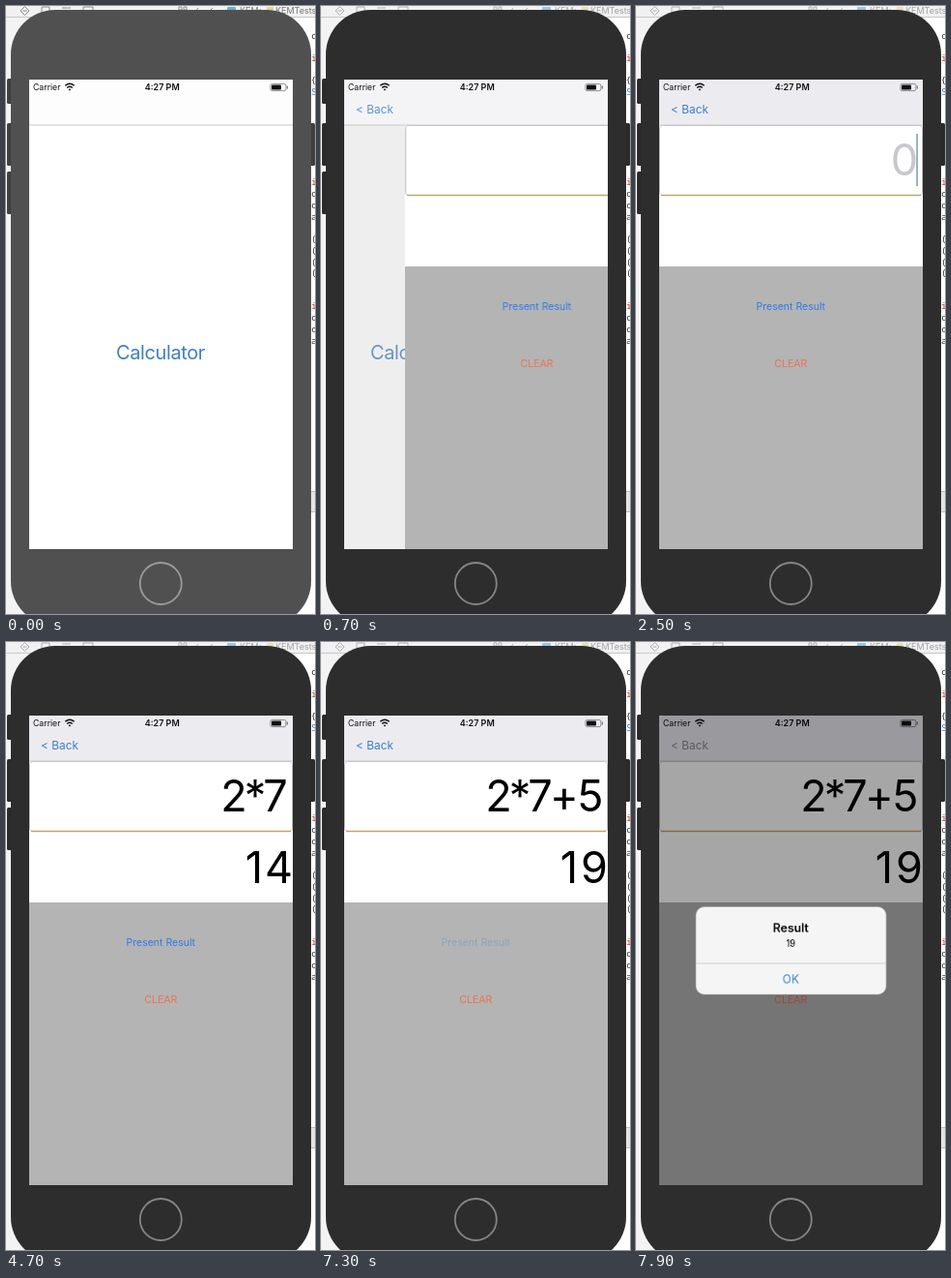
An HTML page that plays this animation: 320 by 628 pixels, repeating every 8 s.

```html
<!DOCTYPE html>
<html lang="en">
<head>
<meta charset="utf-8">
<title>Calculator demo</title>
<style>
html, body { margin: 0; width: 100%; height: 100%; overflow: hidden; background: #f3f3f3; }
svg { display: block; width: 320px; height: 628px; font-family: Inter, Roboto, sans-serif; }
.mid { text-anchor: middle; }
.big { font-size: 45px; text-anchor: middle; }
.code { font: 9.5px "Noto Sans Mono", monospace; }
.anim, .anim * { animation: 8s linear infinite; }

/* window focus */
.anim .shell { animation-name: shell; animation-timing-function: step-end; }
.anim .keys { animation-name: keys; animation-timing-function: step-end; }
.anim .ring { animation-name: ring; animation-timing-function: step-end; }
.anim .bar { animation-name: bar; animation-timing-function: step-end; }
@keyframes shell { 0%, 100% { fill: #505050; } 5% { fill: #2d2d2d; } }
@keyframes keys { 0%, 100% { fill: #3f3f3f; } 5% { fill: #2a2a2a; } }
@keyframes ring { 0%, 100% { stroke: #9a9a9a; } 5% { stroke: #858585; } }
@keyframes bar { 0%, 100% { opacity: 1; } 5% { opacity: .65; } }

/* page push */
.anim .home { animation-name: home; }
.anim .shade { animation-name: shade; }
.anim .page { animation-name: page; }
.anim .nav { animation-name: nav; }
.anim .back { animation-name: back; }
.anim .open { animation-name: open; }
@keyframes home {
  0%, 5% { transform: none; animation-timing-function: cubic-bezier(.25,.37,.3,1); }
  13.75%, 100% { transform: translateX(-82px); }
}
@keyframes shade {
  0%, 5% { opacity: 0; animation-timing-function: cubic-bezier(.25,.37,.3,1); }
  13.75%, 100% { opacity: .088; }
}
@keyframes page {
  0%, 5% { transform: translateX(273px); animation-timing-function: cubic-bezier(.25,.37,.3,1); }
  13.75%, 100% { transform: none; }
}
@keyframes nav { 0%, 5% { fill: #fdfdfd; } 12%, 100% { fill: #ecebf0; } }
@keyframes back { 0%, 5% { opacity: 0; } 8.75% { opacity: .82; } 12%, 100% { opacity: 1; } }
@keyframes open { 0%, 1.2% { opacity: 1; } 2.5%, 5% { opacity: .3; } 8.75% { opacity: .75; } 12%, 100% { opacity: 1; } }

/* typing and results */
.anim .hint, .anim .typed, .anim .sum { animation-timing-function: step-end; }
.anim .hint { animation-name: hint; }
.anim .t1 { animation-name: t1; }
.anim .t2 { animation-name: t2; }
.anim .t3 { animation-name: t3; }
.anim .t4 { animation-name: t4; }
.anim .t5 { animation-name: t5; }
.anim .s1 { animation-name: s1; }
.anim .s2 { animation-name: s2; }
@keyframes hint { 0% { opacity: 1; } 45%, 100% { opacity: 0; } }
@keyframes t1 { 0%, 49.375%, 100% { opacity: 0; } 45% { opacity: 1; } }
@keyframes t2 { 0%, 53.75%, 100% { opacity: 0; } 49.375% { opacity: 1; } }
@keyframes t3 { 0%, 68.75%, 100% { opacity: 0; } 53.75% { opacity: 1; } }
@keyframes t4 { 0%, 73.125%, 100% { opacity: 0; } 68.75% { opacity: 1; } }
@keyframes t5 { 0% { opacity: 0; } 73.125%, 100% { opacity: 1; } }
@keyframes s1 { 0%, 81.25%, 100% { opacity: 0; } 56.25% { opacity: 1; } }
@keyframes s2 { 0% { opacity: 0; } 81.25%, 100% { opacity: 1; } }
.anim .caret { animation-name: caret; }
@keyframes caret {
  0%, 18.74% { opacity: 0; }
  18.75%, 22.5% { opacity: 1; }
  26.25%, 29.75% { opacity: 0; }
  31.25% { opacity: .68; }
  33.125%, 37.5% { opacity: 1; }
  41.25%, 44.99% { opacity: 0; }
  45%, 56.24% { opacity: 1; }
  56.25%, 62.49% { opacity: 0; }
  62.5%, 66.25% { opacity: 1; }
  68.5% { opacity: .2; }
  68.75%, 81.24% { opacity: 1; }
  81.25%, 100% { opacity: 0; }
}

/* alert */
.anim .show { animation-name: show; }
.anim .dim { animation-name: dim; }
.anim .grey { animation-name: grey; }
.anim .alert { animation-name: alert; transform-origin: 160.5px 318.5px; }
@keyframes show { 0%, 88.7% { opacity: 1; } 88.75%, 93.75% { opacity: .3; } 98%, 100% { opacity: 1; } }
@keyframes dim { 0%, 94% { opacity: 0; } 95% { opacity: .09; } 98.5%, 100% { opacity: .35; } }
@keyframes grey { 0%, 95% { fill: #3a80c6; } 98.5%, 100% { fill: #8b8b8d; } }
@keyframes alert {
  0%, 94% { opacity: 0; transform: scale(1.19); }
  95% { opacity: .47; transform: scale(1.14); }
  97% { opacity: .97; transform: scale(1.04); }
  98.5%, 100% { opacity: 1; transform: none; }
}
</style>
</head>
<body>
<svg class="anim" viewBox="0 0 320 628">
  <defs>
    <clipPath id="screen"><rect x="24" y="76" width="273" height="485"/></clipPath>
  </defs>

  <!-- editor window behind the phone -->
  <rect width="320" height="628" fill="#f3f3f3"/>
  <rect x="300" y="11" width="20" height="617" fill="#fff"/>
  <rect width="320" height="11" fill="#f1f1f1"/>
  <path d="M0 11.5H320" stroke="#c9c9c9"/>
  <g class="bar">
    <g fill="none" stroke="#8b8b8b">
      <path d="M19.500 0.500l4.500 4.500l-4.500 4.500l-4.500 -4.500zM17.500 5h4M37 1h8v6h-8zM58 2h9M58 5h9M80 1h10v5h-10z"/>
      <path d="M179 1h3v3h-3zM184 1h3v3h-3zM196 6l3 -4M214 2l-3 3"/>
    </g>
    <rect x="229" y="1" width="9" height="7" rx="1" fill="#69aee0"/>
    <g font-size="9" fill="#777">
      <text x="242" y="8">KEM</text><text x="262" y="8">›</text>
      <text x="279" y="8">KEMTests</text>
    </g>
    <rect x="270" y="1" width="7" height="7" rx="1" fill="#e3d68f"/>
  </g>
  <g class="code" fill="#333">
    <text x="316" y="34">c</text><text x="316" y="57" fill="#c9302c">i</text>
    <text x="315.500" y="80">{</text><text x="316" y="92" fill="#3f79b5">S</text>
    <text x="316" y="185" fill="#c9302c">i</text>
    <text x="316" y="197">c</text><text x="316" y="209">c</text><text x="316" y="221">a</text>
    <text x="316" y="244">(</text><text x="316" y="256">(</text><text x="316" y="268">(</text><text x="316" y="279">(</text>
    <text x="316" y="313" fill="#c9302c">i</text>
    <text x="316" y="325">c</text><text x="316" y="337">c</text><text x="316" y="349">a</text>
  </g>
  <path d="M314 501.500h6M314 522.500h6" stroke="#bdbdbd"/>
  <rect x="314" y="502" width="6" height="20" fill="#e4e4e4"/>

  <!-- phone -->
  <g class="keys">
    <rect x="1" y="75" width="7" height="26" rx="1.500"/>
    <rect x="1" y="121" width="7" height="44" rx="1.500"/>
    <rect x="1" y="171" width="7" height="44" rx="1.500"/>
    <rect x="312" y="121" width="8" height="44" rx="1.500"/>
  </g>
  <rect class="shell" x="5" y="4" width="311" height="636" rx="46"/>
  <circle class="ring" cx="160.300" cy="596.500" r="21.500" fill="none" stroke-width="1.800"/>

  <g clip-path="url(#screen)">
    <rect x="24" y="76" width="273" height="485" fill="#fff"/>
    <g class="home">
      <text class="open mid" x="160" y="365" font-size="20" letter-spacing="-.02em" fill="#3f80c0">Calculator</text>
    </g>
    <rect class="shade" x="24" y="123" width="273" height="438"/>

    <g class="page">
      <rect x="24" y="123" width="273" height="146" fill="#fff"/>
      <rect x="24" y="269" width="273" height="292" fill="#b4b4b4"/>
      <rect x="24.500" y="123.500" width="272" height="72" rx="3" fill="#fff" stroke="#c6c6c6"/>
      <path d="M26 195.500H295" stroke="#c4a46c" stroke-width="1.300"/>
      <text class="big hint" x="278" y="175" fill="#c7c7cc">0</text>
      <text class="big typed t1" x="279" y="175">2</text>
      <text class="big typed t2" x="257 281" y="175">2*</text>
      <text class="big typed t3" x="236 258 279" y="175">2*7</text>
      <text class="big typed t4" x="211 233 254 278" y="175">2*7+</text>
      <text class="big typed t5" x="184 206 227 252 279" y="175">2*7+5</text>
      <rect class="caret" x="290.300" y="132" width="1.500" height="54" fill="#46629f"/>
      <text class="big sum s1" x="257 282.500" y="249">14</text>
      <text class="big sum s2" x="257 283" y="249">19</text>
      <text class="show mid" x="160.300" y="314" font-size="10.500" fill="#2f7ae5">Present Result</text>
      <text class="mid" x="160.300" y="373" font-size="10.600" fill="#ee7250">CLEAR</text>
    </g>

    <rect class="nav" x="24" y="76" width="273" height="47"/>
    <path d="M24 123H297" stroke="#c8c8cb" stroke-width="1"/>
    <g class="back"><text class="grey" x="36" y="111" font-size="11.900">&lt; Back</text></g>

    <text x="28" y="87" font-size="8.700" fill="#111">Carrier</text>
    <g fill="none" stroke="#111" stroke-width="1.500">
      <path d="M61.300 82.300q4.700 -4.200 9.400 0M63.200 84.500q2.800 -2.400 5.600 0"/>
    </g>
    <path d="M64.600 86.100q1.400 -1.100 2.800 0L66 87.600z" fill="#111"/>
    <text class="mid" x="161.700" y="87" font-size="9" font-weight="600" fill="#111">4:27 PM</text>
    <rect x="273.900" y="80.400" width="16" height="7.200" rx="1.800" fill="none" stroke="#777" stroke-width=".8"/>
    <rect x="275" y="81.400" width="10" height="5.200" rx=".8" fill="#111"/>
    <path d="M291.300 82.600v2.800" stroke="#777" stroke-width="1.200"/>

    <rect class="dim" x="24" y="76" width="273" height="485"/>
    <g class="alert">
      <rect x="62" y="273.500" width="197" height="90.500" rx="9" fill="#f5f5f5"/>
      <path d="M62 332H259" stroke="#c9c9c9" stroke-width=".9"/>
      <text class="mid" x="160.300" y="300" font-size="12.200" font-weight="600">Result</text>
      <text class="mid" x="160.300" y="314.500" font-size="9.400">19</text>
      <text class="mid" x="160.300" y="352.500" font-size="12" fill="#3f80c4">OK</text>
    </g>
  </g>
</svg>
</body>
</html>
```
